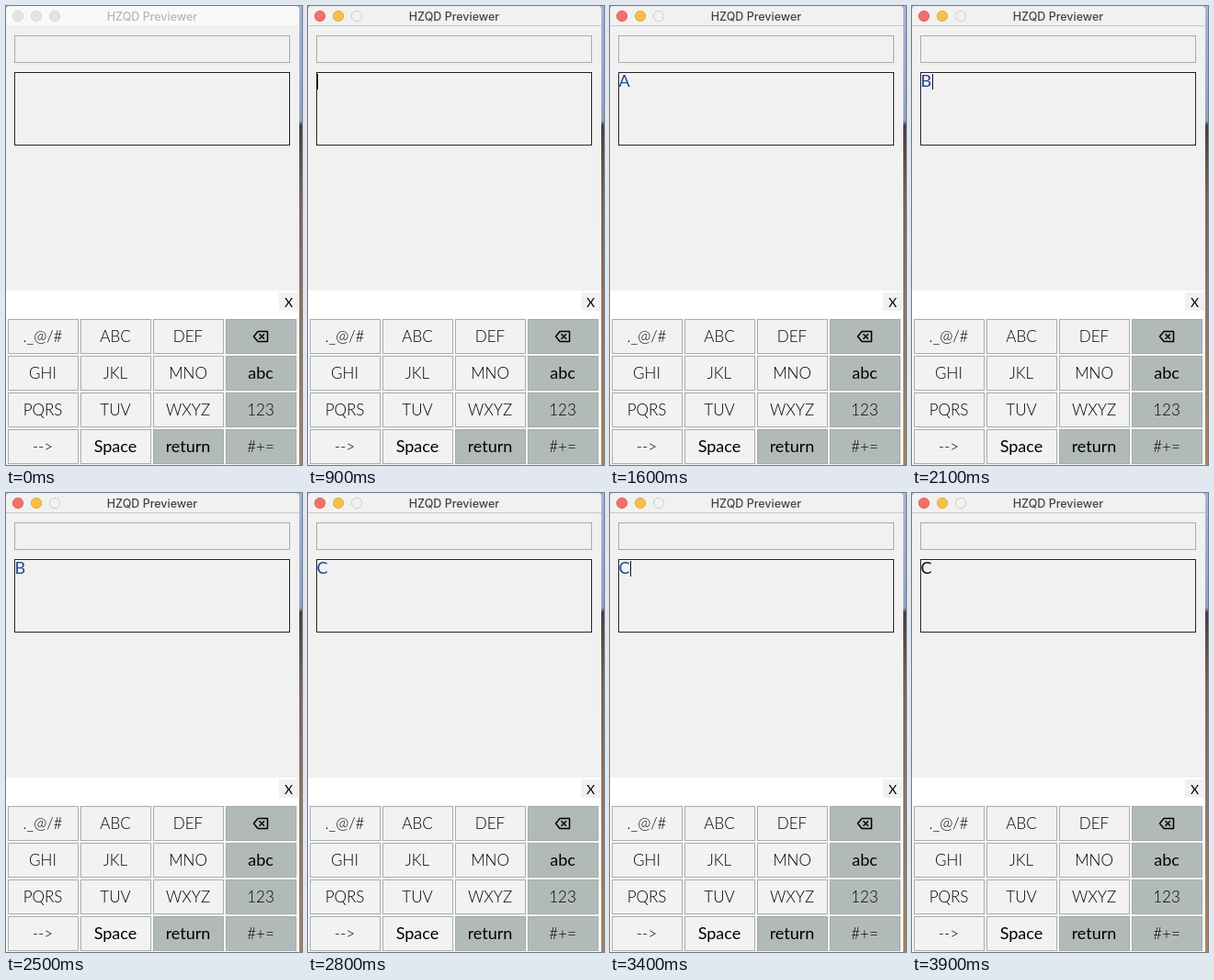
Recreate the animation shown at these times as an HTML page. Size 322 by 500 pixels, loop 4000 ms.

```html
<!DOCTYPE html>
<html lang="en">
<head>
<meta charset="utf-8">
<title>Keypad input</title>
<style>
  html, body { margin: 0; width: 100%; height: 100%; overflow: hidden; background: #f1f1f1; }
  svg { display: block; width: 322px; height: 500px; }
  text { font: 300 17px Lato, sans-serif; fill: #000; }
  .mid { text-anchor: middle; }
  .word, #entry { font-size: 18px; font-weight: 400; }
  #close { font-size: 14px; font-weight: 400; }
  #title { font: 500 12.5px Inter, sans-serif; }
  .key { fill: #f2f2f2; stroke: #a9adad; }
  .key.dark { fill: #b1bab9; stroke: #a3acab; }
</style>
</head>
<body>
<svg id="stage" viewBox="0 0 322 500">
  <defs>
    <linearGradient id="desktop" x1="0" y1="0" x2="0" y2="1">
      <stop offset="0" stop-color="#9fb6de"/>
      <stop offset=".25" stop-color="#8ca3cc"/>
      <stop offset=".26" stop-color="#4b3c38"/>
      <stop offset=".42" stop-color="#80624f"/>
      <stop offset=".65" stop-color="#967458"/>
      <stop offset="1" stop-color="#b0824f"/>
    </linearGradient>
  </defs>
  <rect width="322" height="500" fill="url(#desktop)"/>
  <rect y="20" width="319" height="480" fill="#f1f1f1"/>
  <path id="bar" d="M0 21V4Q0 0 4 0H315Q319 0 319 4V21Z"/>
  <rect id="barLine" y="21" width="319" height="1"/>
  <g id="lights"></g>
  <text id="title" class="mid" x="159" y="16">HZQD Previewer</text>

  <rect x="9.5" y="32.5" width="299" height="29" fill="none" stroke="#aaa"/>
  <rect x="10.5" y="73.5" width="297" height="77" fill="none" stroke="#fafafa"/>
  <rect x="9.5" y="72.5" width="299" height="79" fill="none" stroke="#222"/>
  <text id="entry" x="9.5" y="88"></text>
  <rect id="caret" y="74" width="1" height="17" fill="#111"/>

  <rect y="310" width="319" height="30" fill="#fff"/>
  <rect x="297" y="312" width="21" height="20" fill="#f1f1f1"/>
  <text id="close" class="mid" x="307.5" y="328">X</text>
  <rect y="340" width="319" height="160" fill="#f7f7f7"/>
  <g id="keys"></g>
  <g fill="none" stroke="#000" stroke-width="1.5" stroke-linejoin="round">
    <path d="M269.5 360 274 354.5H284.5V365.5H274Z"/>
    <path d="M275.5 357.2 281 362.8M281 357.2 275.5 362.8"/>
  </g>
</svg>
<script>
const LOOP = 4000;
const ACTIVE_AT = 500;
const LIGHTS = [["#f0716a", "#e2675f"], ["#f5bf4a", "#e6b03f"], ["#f1f1f1", "#cfcfcf"]];
const ROWS = [
  ["._@/#", "ABC", "DEF", ""],
  ["GHI", "JKL", "MNO", "abc"],
  ["PQRS", "TUV", "WXYZ", "123"],
  ["-->", "Space", "return", "#+="]
];
const ENTRY = [
  [0, "", "#111"],
  [1300, "A", "#1d458f"],
  [2100, "B", "#1d458f"],
  [2800, "C", "#1d458f"],
  [3700, "C", "#111"]
];
const CARET_ON = [[600, 1200], [1800, 2400], [3000, 3600]];

const $ = id => document.getElementById(id);

function add(parent, tag, attrs, text = "") {
  const el = document.createElementNS(parent.namespaceURI, tag);
  for (const name in attrs) el.setAttribute(name, attrs[name]);
  el.textContent = text;
  return parent.appendChild(el);
}

const lights = LIGHTS.map((_, i) => add($("lights"), "circle", { cx: 13 + i * 20, cy: 11, r: 5.7 }));

ROWS.forEach((row, r) => row.forEach((label, c) => {
  const x = 2 + c * 79, y = 341 + r * 40;
  const dark = c === 3 || label === "return";
  const word = /[a-z]/.test(label);
  add($("keys"), "rect", { class: dark ? "key dark" : "key", x: x + .5, y: y + .5, width: 76, height: 37 });
  add($("keys"), "text", { class: word ? "mid word" : "mid", x: x + 38, y: y + 24.5 }, label);
}));

function draw(t) {
  const active = t >= ACTIVE_AT;
  $("bar").style.fill = active ? "#f1f1f1" : "#f9f9f9";
  $("barLine").style.fill = active ? "#c9c9c9" : "#eeeeee";
  $("title").style.fill = active ? "#444" : "#b7b7b7";
  lights.forEach((light, i) => {
    const [fill, stroke] = active ? LIGHTS[i] : ["#e3e3e3", "#dadada"];
    light.style.fill = fill;
    light.style.stroke = stroke;
  });

  const [, letter, color] = ENTRY.filter(step => t >= step[0]).pop();
  $("entry").textContent = letter;
  $("entry").style.fill = color;
  $("caret").setAttribute("x", letter ? 22 : 10);
  $("caret").style.opacity = CARET_ON.some(([on, off]) => t >= on && t < off) ? 1 : 0;
}

const start = performance.now();
function tick() {
  draw((performance.now() - start) % LOOP);
  requestAnimationFrame(tick);
}
tick();
</script>
</body>
</html>
```
